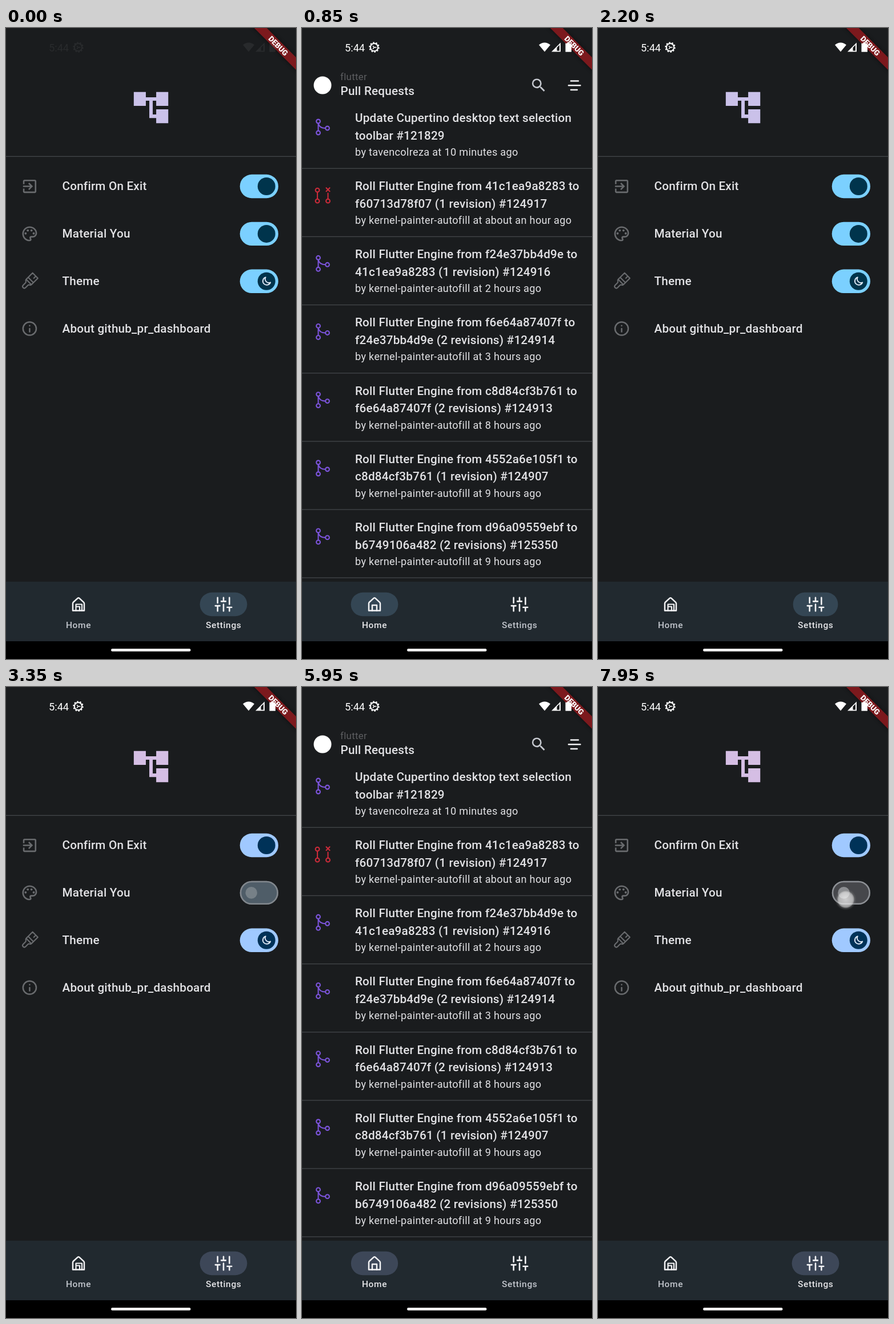
An HTML page that plays this animation: 508 px wide and 1102 px high, repeating every 8000 ms.

```html
<!DOCTYPE html>
<html lang="en">
<head>
<meta charset="utf-8">
<title>Pull request dashboard</title>
<style>
  html, body { margin: 0; width: 100%; height: 100%; overflow: hidden; background: #000; }
  svg { display: block; width: 508px; height: 1102px; font-family: Roboto, sans-serif; }
  text { fill: #e2e2e5; white-space: pre; }
  .title { font-size: 20.7px; font-weight: 500; letter-spacing: .194px; }
  .sub { font-size: 18.1px; letter-spacing: .323px; }
  .label { font-size: 15.5px; font-weight: 500; letter-spacing: .647px; text-anchor: middle; }
  .line { fill: none; stroke-linecap: round; stroke-linejoin: round; }
</style>
</head>
<body>
<svg viewBox="0 0 508 1102">
  <defs>
    <radialGradient id="glow">
      <stop offset="0" stop-color="#fff" stop-opacity=".72"/>
      <stop offset=".62" stop-color="#e4e4e4" stop-opacity=".7"/>
      <stop offset=".74" stop-color="#ccc" stop-opacity=".6"/>
      <stop offset=".8" stop-color="#999" stop-opacity=".3"/>
      <stop offset="1" stop-color="#777" stop-opacity="0"/>
    </radialGradient>
    <filter id="soft" x="-20%" y="-100%" width="140%" height="300%"><feGaussianBlur stdDeviation="3.5"/></filter>
    <g id="merge" class="line" stroke="#7c54db" stroke-width="2.1">
      <circle cx="-7.5" cy="-10" r="3.4"/><circle cx="-7.5" cy="10" r="3.4"/><circle cx="8.5" cy="2" r="3.4"/>
      <path d="M-7.5-6.5v13M-7.5-6.5C-6 0-2 2 5 2"/>
    </g>
    <g id="closed" class="line" stroke="#cc2b3a" stroke-width="2.1">
      <circle cx="-9" cy="-9" r="3.4"/><circle cx="-9" cy="10" r="3.4"/><circle cx="9.5" cy="10" r="3.4"/>
      <path d="M-9-5.5v12M9.5-3.5v10M6.5-13l6 6m0-6l-6 6"/>
    </g>
  </defs>

  <rect width="508" height="1071" fill="#1a1c1e"/>

  <g id="home">
    <circle cx="36" cy="100" r="15.5" fill="#fff"/>
    <text x="67" y="91" style="font-size:16.8px;letter-spacing:.32px;fill:#5d5e61">flutter</text>
    <text class="title" x="67.5" y="117">Pull Requests</text>
    <path transform="translate(399 84.5) scale(1.2935)" fill="#c5c8cf" d="M15.5 14h-.79l-.28-.27A6.471 6.471 0 0 0 16 9.5 6.5 6.5 0 1 0 9.5 16c1.61 0 3.09-.59 4.23-1.57l.27.28v.79l5 4.99L20.49 19l-4.99-5zm-6 0C7.01 14 5 11.99 5 9.5S7.01 5 9.5 5 14 7.01 14 9.5 11.99 14 9.5 14z"/>
    <path class="line" stroke="#f0f0f2" stroke-width="2.6" d="M471 92.5h13M467 100.3h20.500M471 108h11"/>
    <g id="list"></g>
  </g>

  <g id="settings">
    <path id="tree" transform="translate(217.800 102.800) scale(3.02)" d="M22 11V3h-7v3H9V3H2v8h7V8h2v10h4v3h7v-8h-7v3h-2V8h2v3z"/>
    <rect y="223.700" width="508" height="1.3" fill="#43464a"/>
    <g transform="translate(25.900 261) scale(1.2935)" fill="#696b6e">
      <path d="M10.090 15.590L11.500 17l5-5-5-5-1.410 1.410L12.670 11H3v2h9.670l-2.580 2.590zM19 3H5c-1.110 0-2 .9-2 2v4h2V5h14v14H5v-4H3v4c0 1.100.89 2 2 2h14c1.100 0 2-.9 2-2V5c0-1.100-.9-2-2-2z"/>
    </g>
    <g transform="translate(25.900 343.900) scale(1.2935)" fill="#696b6e">
      <path d="M12 22C6.490 22 2 17.510 2 12S6.490 2 12 2s10 4.040 10 9c0 3.310-2.690 6-6 6h-1.770c-.28 0-.5.22-.5.5 0 .12.05.23.13.33.41.47.64 1.060.64 1.670A2.500 2.500 0 0 1 12 22zm0-18c-4.410 0-8 3.590-8 8s3.590 8 8 8c.28 0 .5-.22.5-.5a.54.54 0 0 0-.14-.35c-.41-.46-.63-1.050-.63-1.650a2.500 2.500 0 0 1 2.500-2.500H16c2.210 0 4-1.790 4-4 0-3.860-3.590-7-8-7z"/>
      <circle cx="6.500" cy="11.500" r="1.5"/><circle cx="9.500" cy="7.500" r="1.5"/>
      <circle cx="14.500" cy="7.500" r="1.5"/><circle cx="17.500" cy="11.500" r="1.5"/>
    </g>
    <g transform="translate(42 441.500) rotate(45)" class="line" stroke="#696b6e" stroke-width="2.100">
      <path d="M-6.500 3v-16H6.500V3zM-6.500-2H6.500M1.500-13v5M-6.500 3c0 3 3.500 2 3.500 5v6a3 3 0 0 0 6 0v-6c0-3 3.500-2 3.500-5"/>
    </g>
    <g transform="translate(41.400 525)" class="line" stroke="#696b6e" stroke-width="2.500">
      <circle r="11.600"/><path d="M0 0v5.500M0-5.200v.1"/>
    </g>
    <g id="options"></g>
  </g>

  <rect y="967" width="508" height="104" fill="#21292f"/>
  <rect id="pill0" class="pill" x="-41.400" y="-20.700" width="82.800" height="41.400" rx="20.700"/>
  <rect id="pill1" class="pill" x="-41.400" y="-20.700" width="82.800" height="41.400" rx="20.700"/>
  <g class="line" stroke="#f2f2f4" stroke-width="2.500" transform="translate(127 1006.500)">
    <path d="M-10-1.500Q-10-2.800-9-3.700L-1.200-10.800Q0-11.700 1.200-10.800L9-3.700Q10-2.800 10-1.500V11H-10z"/>
    <path id="door" d="M-4 11V1.500H4V11"/>
    <path id="garage" stroke-width="2.200" d="M-4.500 11V0H6V11M-4.500 4H2M2 4V11"/>
  </g>
  <path class="line" stroke="#f2f2f4" stroke-width="2" transform="translate(365.500 991) scale(1.2935)" d="M4 21v-7M4 10V3M12 21v-9M12 8V3M20 21v-5M20 12V3M1 14h6M9 8h6M17 16h6"/>
  <text id="tab0" class="label" x="127" y="1048">Home</text>
  <text id="tab1" class="label" x="381.200" y="1048">Settings</text>

  <rect y="1071" width="508" height="31"/>
  <rect x="184" y="1084" width="139.500" height="4.800" rx="2.400" fill="#f4f4f4"/>

  <g transform="translate(508 0) rotate(45)">
    <rect x="-80" y="36.200" width="160" height="15.500" fill="#000" opacity=".5" filter="url(#soft)"/>
    <rect x="-80" y="36.200" width="160" height="15.500" fill="#7c191d"/>
  </g>
  <g id="status" fill="#fff">
    <text x="75" y="41" style="font-size:18.200px;fill:#fff">5:44</text>
    <g transform="translate(126.500 33.700)" fill="none" stroke="#fff">
      <circle r="6.600" stroke-width="2"/><circle r="8.200" stroke-width="2" stroke-dasharray="2.600 2.552"/>
      <path d="M-2.500-2.500L0 0l-2.500 3M0 0h4" stroke-width="1.400"/>
    </g>
    <path d="M415 29.500Q425 21.500 435 29.500L425 41.500z"/>
    <path fill-rule="evenodd" d="M437 41.500L453 25.500V41.500zM446.500 34.300V39.800H451V29.800z"/>
    <path d="M464.500 25h4v1.800h3.500v15h-10.500V26.800h3z"/>
  </g>
  <text transform="translate(508 0) rotate(45)" y="48.700" text-anchor="middle" style="font-size:13.200px;font-weight:900;fill:#fff">DEBUG</text>
  <circle id="touch" r="19" fill="url(#glow)"/>
</svg>

<script>
const LOOP = 8000;
const $ = id => document.getElementById(id);
const clamp = v => Math.min(1, Math.max(0, v));
const mix = (a, b, p) => a + (b - a) * p;
const blend = (a, b, p) => `rgb(${a.map((v, i) => Math.round(mix(v, b[i], clamp(p))))})`;
const show = (el, on) => el.setAttribute('visibility', on ? 'visible' : 'hidden');

// Pull request list
const roll = (from, to, revs, id, ago) =>
  [`Roll Flutter Engine from ${from} to`, `${to} (${revs}) #${id}`, `kernel-painter-autofill at ${ago} ago`];
const pulls = [
  ['Update Cupertino desktop text selection', 'toolbar #121829', 'tavencolreza at 10 minutes ago'],
  roll('41c1ea9a8283', 'f60713d78f07', '1 revision', 124917, 'about an hour'),
  roll('f24e37bb4d9e', '41c1ea9a8283', '1 revision', 124916, '2 hours'),
  roll('f6e64a87407f', 'f24e37bb4d9e', '2 revisions', 124914, '3 hours'),
  roll('c8d84cf3b761', 'f6e64a87407f', '2 revisions', 124913, '8 hours'),
  roll('4552a6e105f1', 'c8d84cf3b761', '1 revision', 124907, '9 hours'),
  roll('d96a09559ebf', 'b6749106a482', '2 revisions', 125350, '9 hours')
];
$('list').innerHTML = pulls.map(([a, b, by], i) => `
  <g transform="translate(0 ${i * 119.15})">
    <use href="#${i === 1 ? 'closed' : 'merge'}" x="36" y="173"/>
    <text class="title" x="93" y="164">${a}</text>
    <text class="title" x="93" y="194.700">${b}</text>
    <text class="sub" x="93" y="223">by ${by}</text>
    <rect y="244.600" width="508" height="1.3" fill="#43464a"/>
  </g>`).join('');

// Settings rows
const moon = '<path class="line" stroke="#dfe8f5" stroke-width="1.900" d="M-1.500-7A6.900 6.900 0 1 0 7 2A6.500 6.500 0 0 1-1.500-7z" transform="translate(456.300 0)"/>';
const options = ['Confirm On Exit', 'Material You', 'Theme', 'About github_pr_dashboard'];
$('options').innerHTML = options.map((name, i) => `
  <g transform="translate(0 ${276.5 + i * 82.9})">
    <text class="title" x="98.500" y="6.500">${name}</text>
    ${i < 3 ? `<rect class="track" x="409.700" y="-20.700" width="67.300" height="41.400" rx="20.700"/>
    <rect class="rim" x="411" y="-19.400" width="64.700" height="38.800" rx="19.400" fill="none" stroke="#8d9095" stroke-width="2.600" opacity="0"/>
    <circle class="thumb" cx="456.300" r="15.500"/>` : ''}
    ${i === 2 ? moon : ''}
  </g>`).join('');
const tracks = document.querySelectorAll('.track');
const rims = document.querySelectorAll('.rim');
const thumbs = document.querySelectorAll('.thumb');

// Easing
function bezier(x1, y1, x2, y2, x) {
  const at = (a, b, s) => 3 * a * s * (1 - s) ** 2 + 3 * b * s * s * (1 - s) + s ** 3;
  let lo = 0, hi = 1;
  for (let i = 0; i < 24; i++) {
    const mid = (lo + hi) / 2;
    if (at(x1, x2, mid) < x) lo = mid; else hi = mid;
  }
  return at(y1, y2, lo);
}
const emphasized = x => x < 1 / 6
  ? .4 * bezier(.3, 0, .8, .15, x * 6)
  : .4 + .6 * bezier(.05, .7, .1, 1, (x - 1 / 6) * 1.2);
const outBack = x => 1 + 2.70158 * (x - 1) ** 3 + 1.70158 * (x - 1) ** 2;

// Timeline: [time, tab] and [start, end, x, y]
const tabs = [[-1000, 1], [25, 0], [1950, 1], [5550, 0], [6612, 1]];
const touches = [
  [1840, 2040, 377, 1012], [2980, 3180, 440, 368], [5400, 5650, 128, 997],
  [6510, 6720, 375, 1015], [7750, 8000, 434, 371]
];
const TOGGLE = 3100;

const blue = [123, 208, 255], navy = [0, 52, 76], blue2 = [160, 201, 255], navy2 = [0, 50, 88];
const pills = [$('pill0'), $('pill1')], labels = [$('tab0'), $('tab1')];

function render(t) {
  const [since, tab] = tabs.filter(e => e[0] <= t).pop();
  const age = t - since;
  const theme = clamp((t - TOGGLE) / 200);

  show($('home'), tab === 0);
  show($('settings'), tab === 1);
  $('status').setAttribute('opacity', t < 50 ? .06 : 1);

  pills.forEach((pill, i) => {
    const on = i === tab;
    const sx = on ? emphasized(clamp(age / 500)) : 1;
    pill.setAttribute('transform', `translate(${i ? 381 : 127} 1006.500) scale(${sx} 1)`);
    pill.setAttribute('opacity', on ? clamp(age / 60) : 1 - clamp(age / 100));
    pill.setAttribute('fill', blend([52, 70, 84], [61, 71, 88], theme));
    labels[i].style.fill = on ? '#e6e6e9' : '#c2c6cd';
  });
  const plain = tab === 0 || age < 120;
  show($('door'), plain);
  show($('garage'), !plain);

  $('tree').setAttribute('fill', blend([202, 193, 233], [213, 190, 228], theme));
  const x = clamp((t - TOGGLE) / 300), off = x ? outBack(x) : 0;
  tracks.forEach((track, i) => {
    const p = i === 1 ? off : 0;
    const on = blend(blue, blue2, theme), knob = blend(navy, navy2, theme);
    track.setAttribute('fill', i === 1 ? blend(blue, [70, 71, 75], x) : on);
    rims[i].setAttribute('opacity', i === 1 ? x : 0);
    thumbs[i].setAttribute('cx', mix(456.3, 430.6, p));
    thumbs[i].setAttribute('r', mix(15.5, 10.3, clamp(p)));
    thumbs[i].setAttribute('fill', i === 1 ? blend(navy, [141, 143, 147], x) : knob);
  });

  const hit = touches.find(([a, b]) => t >= a && t < b);
  show($('touch'), hit);
  if (hit) $('touch').setAttribute('transform', `translate(${hit[2]} ${hit[3]})`);
}

const start = performance.now();
function tick() {
  render((performance.now() - start) % LOOP);
  requestAnimationFrame(tick);
}
tick();
</script>
</body>
</html>
```
